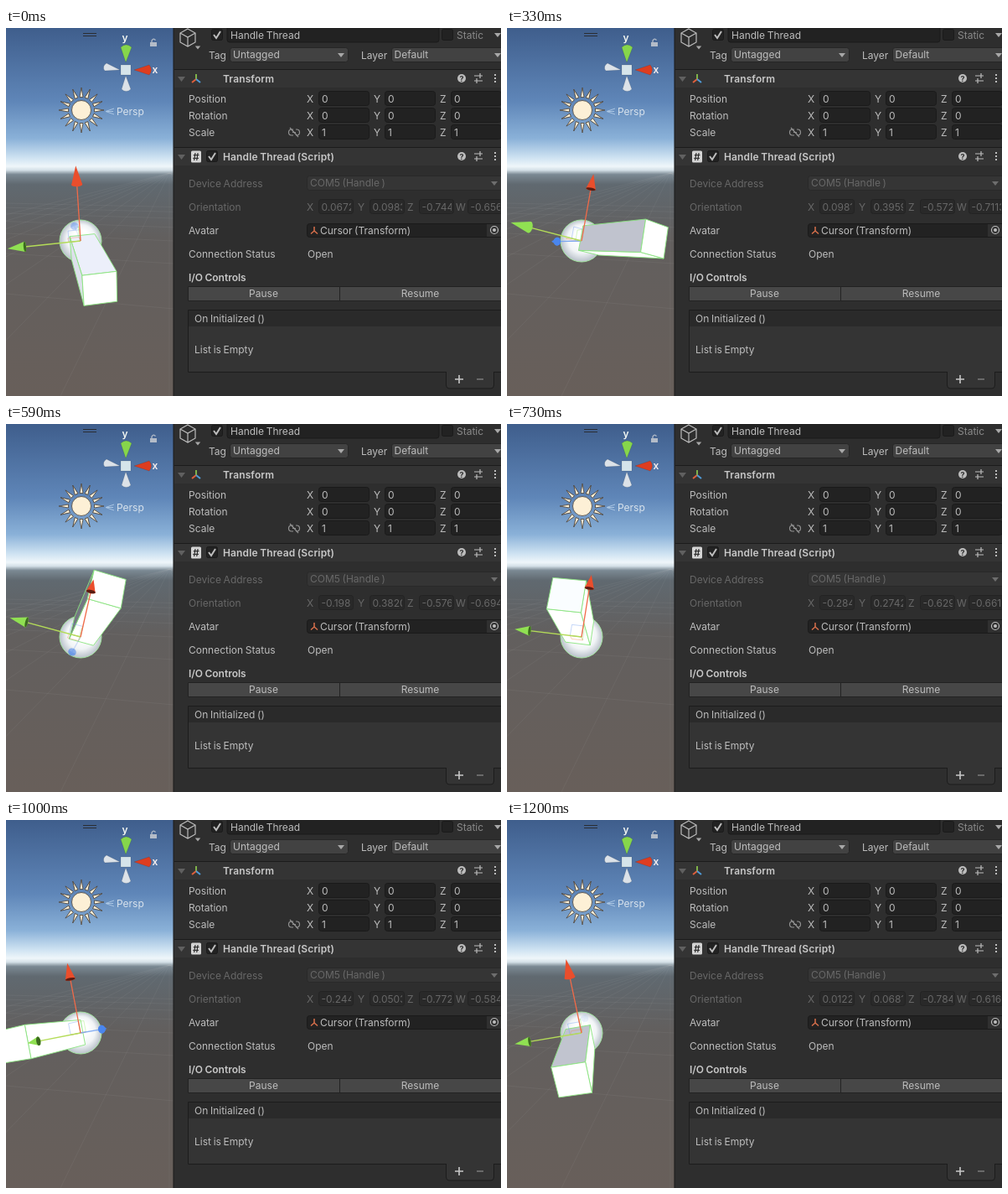
Write an HTML page with a canvas that moves like this. It is 591 px wide and 439 px high and loops after 1.28 s.

```html
<!DOCTYPE html>
<html lang="en">
<head>
<meta charset="utf-8">
<title>Handle Thread</title>
<style>
html, body { margin: 0; width: 100%; height: 100%; overflow: hidden; background: #2e2e2e; }
svg, canvas { position: absolute; left: 0; top: 0; display: block; }
text { font: 12px Inter, "Open Sans", sans-serif; word-spacing: -.7px; fill: #bdbdbd; }
.b { font-weight: 600; letter-spacing: .13px; fill: #c8c8c8; }
.dim { fill: #686868; }
.mid { text-anchor: middle; }
.field { fill: #222; stroke: #1a1a1a; }
.drop { fill: #424242; stroke: #262626; }
.line { fill: none; stroke: #bdbdbd; stroke-width: 1.2; }
</style>
</head>
<body>
<svg width="591" height="439" viewBox="0 0 591 439">
  <defs>
    <linearGradient id="sky" x2="0" y2="1">
      <stop offset="0" stop-color="#3f5e8c"/>
      <stop offset=".2" stop-color="#5f86b8"/>
      <stop offset=".3" stop-color="#8ab1d8"/>
      <stop offset=".353" stop-color="#cfe3f2"/>
      <stop offset=".376" stop-color="#eff6fa"/>
      <stop offset=".386" stop-color="#d5e1e8"/>
      <stop offset=".398" stop-color="#7b8993"/>
      <stop offset=".425" stop-color="#606970"/>
      <stop offset=".57" stop-color="#625f5e"/>
      <stop offset="1" stop-color="#685f5a"/>
    </linearGradient>
    <clipPath id="view"><path d="M0 0H200V439H0z"/></clipPath>
    <g id="axes" fill="none" stroke-width="2">
      <path d="M0 0V-6" stroke="#7fb24a"/><path d="M0 0L-5 4" stroke="#e0603c"/><path d="M0 0L5 4" stroke="#4f9bd8"/>
    </g>
    <path id="down" d="M-4 -2H4L0 3z" fill="#a8a8a8"/>
    <g id="tools">
      <circle cx="544" r="5" fill="#bdbdbd"/>
      <text x="544" y="3.5" class="mid" style="font-size:9px;font-weight:700;fill:#2e2e2e">?</text>
      <path class="line" d="M559 -3H569M559 3H569M566 -6V0M562 0V6"/>
      <path d="M583 -5h2v2h-2zM583 -1h2v2h-2zM583 3h2v2h-2z" fill="#bdbdbd"/>
    </g>
    <g id="check">
      <rect x="-6.5" y="-6.5" width="13" height="13" rx="2" class="field"/>
      <path d="M-4 0L-1 4L4 -4" class="line" style="stroke-width:2"/>
    </g>
  </defs>

  <rect width="200" height="439" fill="url(#sky)"/>
  <g id="grid" clip-path="url(#view)" stroke="#c0c0c0" stroke-opacity=".08"/>
  <path d="M92 6.500H108M92 9.500H108" stroke="#2a2d33"/>

  <g id="sun" transform="translate(90 98)" fill="#fdf0d6" stroke="#4a4038" stroke-width=".8">
    <circle r="11.5"/>
  </g>
  <path d="M129 96L119 99.500L129 103M119 99.500H128" fill="none" stroke="#a9c5e3"/>
  <text x="132" y="104" style="fill:#d8e2ec">Persp</text>

  <g stroke="#00000030" stroke-width=".6">
    <path d="M143 41L137 23Q143.500 17 150 23z" fill="#86d64b"/>
    <path d="M153 50L171 44Q176 50 171 56z" fill="#dd3d20"/>
    <path d="M136 50L120 42Q114 46 118 51z" fill="#dce2e8"/>
    <path d="M143 57L138 73Q143.500 78 149 73z" fill="#dce2e8"/>
    <path d="M137 44H149V56H137z" fill="#d5e4ea"/>
  </g>
  <text x="142" y="16" class="b mid" style="fill:#f2f6f2">y</text>
  <text x="178" y="54" class="b mid" style="fill:#f6eeee">x</text>
  <path d="M172 17H180V22H172z" fill="#b4bcc8"/>
  <path d="M174 17V15Q176 11.500 178.500 14.500" fill="none" stroke="#b4bcc8" stroke-width="1.3"/>

  <rect x="200" width="391" height="439" fill="#2e2e2e"/>
  <rect x="199.500" width="1" height="439" fill="#1b1b1b"/>
  <path d="M201 49.500H591M201 142.500H591" stroke="#1b1b1b"/>
  <path d="M201 50H591V71H201zM201 143H591V164H201z" fill="#343434"/>

  <path class="line" d="M217 1L226 6V17L217 22L208 17V6zM208 6L217 11L226 6M217 11V22"/>
  <use href="#down" transform="translate(229 23) scale(.8)"/>
  <use href="#check" x="252" y="8"/>
  <rect x="264" y="-3" width="253" height="20" rx="3" class="field"/>
  <text x="268" y="13">Handle Thread</text>
  <rect x="520.500" y="1.500" width="13" height="13" rx="2" class="field"/>
  <text x="538" y="13" style="fill:#8a8a8a">Static</text>
  <use href="#down" x="587" y="8"/>

  <text x="242" y="37">Tag</text>
  <rect x="267.500" y="23.500" width="141" height="17" rx="3" class="drop"/>
  <text x="271" y="36">Untagged</text><use href="#down" x="400" y="32"/>
  <text x="424" y="37">Layer</text>
  <rect x="460.500" y="23.500" width="140" height="17" rx="3" class="drop"/>
  <text x="463.500" y="36">Default</text><use href="#down" x="587" y="32"/>

  <path d="M205 58H214L209.500 64zM205 151H214L209.500 157z" fill="#606060"/>
  <use href="#axes" x="227" y="61"/>
  <text x="259" y="65" class="b">Transform</text><use href="#tools" y="60"/>
  <text x="218" y="89">Position</text>
  <text x="218" y="109">Rotation</text>
  <text x="218" y="129">Scale</text>
  <path class="line" opacity=".7" d="M343 121H341A3.500 3.500 0 0 0 341 128H343M346 121H347A3.500 3.500 0 0 1 347 128H346M342 124.500H346M339 119L349 130"/>
  <g id="vectors"></g>

  <rect x="221" y="146.500" width="12" height="14" rx="1.500" fill="#d5d5d5"/>
  <text x="227" y="158" class="b mid" style="fill:#2b2b2b">#</text>
  <use href="#check" x="246" y="153"/>
  <text x="259" y="158" class="b">Handle Thread (Script)</text><use href="#tools" y="153"/>

  <text x="218" y="190" class="dim">Device Address</text>
  <rect x="359.500" y="176.500" width="240" height="17" rx="3" fill="#353535" stroke="#292929"/>
  <text x="363" y="189" class="dim">COM5 (Handle )</text>
  <use href="#down" x="583" y="185" opacity=".5"/>
  <text x="218" y="218" class="dim">Orientation</text>
  <g id="quat"></g>

  <text x="218" y="246">Avatar</text>
  <rect x="359.500" y="233.500" width="240" height="16" rx="3" class="field"/>
  <path d="M368 242V237M368 242L364 245.500M368 242L372 245.500" fill="none" stroke="#d9704c" stroke-width="1.500"/>
  <text x="375" y="246">Cursor (Transform)</text>
  <path d="M574 234H591V249H574z" fill="#303030"/>
  <circle cx="583" cy="241" r="4.500" class="line"/><circle cx="583" cy="241" r="2" fill="#bdbdbd"/>
  <text x="218" y="274">Connection Status</text><text x="360" y="274">Open</text>

  <text x="218" y="302" class="b" style="letter-spacing:0">I/O Controls</text>
  <path d="M217.500 308.500H398.500V325.500H217.500zM398.500 308.500H595V325.500H398.500z" fill="#474747" stroke="#222"/>
  <text x="307.500" y="321" class="mid">Pause</text><text x="494.500" y="321" class="mid">Resume</text>

  <path d="M217.500 336.500H595V410.500H217.500z" fill="#343434" stroke="#1c1c1c"/>
  <path d="M218 337H591V356H218z" fill="#2a2a2a"/>
  <text x="225" y="351">On Initialized ()</text>
  <text x="225" y="388">List is Empty</text>
  <path d="M525.500 410V426Q525.500 430 529 430H579Q582.500 430 582.500 426V410" fill="#343434" stroke="#1c1c1c"/>
  <path d="M536 419H546M541 414V424" stroke="#c8c8c8" stroke-width="1.600"/>
  <path d="M562 419H570" stroke="#777" stroke-width="1.600"/>
</svg>
<canvas id="stage" width="200" height="439"></canvas>

<script>
const $ = id => document.getElementById(id);
const add = (id, markup) => $(id).insertAdjacentHTML('beforeend', markup);

for (let i = 0; i < 16; i++) add('sun', `<path d="M-2 -15.500L0 -27L2 -15.500z" transform="rotate(${i * 22.5})"/>`);

for (let i = -8; i < 9; i++) add('grid', `<path d="M195 173L${195 + i * 130} 439"/>`);
for (let i = 1; i < 9; i++) {
  const y = 173 + 300 / i;
  add('grid', `<path d="M0 ${y - 12 / i}L200 ${y + 24 / i}"/>`);
}

[['X', 359, 377], ['Y', 439, 456], ['Z', 518, 535]].forEach(([name, x, left]) => [0, 0, 1].forEach((value, row) => {
  const y = 89 + row * 20;
  add('vectors', `<text x="${x}" y="${y}">${name}</text>
    <rect x="${left - 3.5}" y="${y - 13.5}" width="60" height="17" rx="3" class="field"/>
    <text x="${left}" y="${y}">${value}</text>`);
}));

[['X', 359], ['Y', 420], ['Z', 479], ['W', 537]].forEach(([name, x], i) => add('quat',
  `<text x="${x}" y="218" class="dim">${name}</text>
   <rect x="${x + 14.5}" y="204.500" width="41" height="17" rx="3" fill="#292929" stroke="#232323"/>
   <clipPath id="clip${i}"><rect x="${x + 15}" y="204" width="38" height="18"/></clipPath>
   <text x="${x + 17.5}" y="218" class="dim value" clip-path="url(#clip${i})"></text>`));
const values = document.querySelectorAll('.value');

// time, box direction x y, red arrow direction x y, quaternion x y z w
const LOOP = 1280;
const keys = [
  [0, .137, -.336, -6, 93, .0672, .0983, -.7443, -.6563],
  [190, .431, -.204, 4, 91, .135, .3312, -.6284, -.6903],
  [330, .538, .012, 14, 78, .0981, .3959, -.5722, -.7113],
  [590, .189, .339, 15, 66, -.1983, .382, -.5763, -.6943],
  [860, -.368, .167, 4, 77, -.3203, .1525, -.6953, -.6243],
  [1000, -.473, -.082, -16, 84, -.2443, .0503, -.7723, -.5843],
  [1200, -.068, -.33, -19, 90, .0122, .0681, -.7843, -.6163]
];
const steps = [0, 70, 130, 190, 260, 330, 400, 460, 520, 590, 660, 730, 800, 860, 930, 1000, 1060, 1130, 1200];

function keyAt(i) {
  const n = keys.length, [t, ...rest] = keys[(i + n) % n];
  return [t + Math.floor(i / n) * LOOP, ...rest];
}

// Periodic cubic spline through the keys
function pose(t) {
  const i = keys.findLastIndex(k => k[0] <= t);
  const [a, b, c, d] = [-1, 0, 1, 2].map(j => keyAt(i + j));
  const span = c[0] - b[0], s = (t - b[0]) / span;
  return b.slice(1).map((p, j) => {
    const k = j + 1, q = c[k];
    const m = (q - a[k]) / (c[0] - a[0]) * span, n = (d[k] - p) / (d[0] - b[0]) * span;
    return p + s * (m + s * (3 * (q - p) - 2 * m - n + s * (2 * (p - q) + m + n)));
  });
}

const g = $('stage').getContext('2d');
const CX = 89, CY = 254, SIZE = 14, START = 20, LENGTH = 116, ARM = 85, DEPTH = 340;
const dot = (a, b) => a[0] * b[0] + a[1] * b[1] + a[2] * b[2];
const cross = (a, b) => [a[1] * b[2] - a[2] * b[1], a[2] * b[0] - a[0] * b[2], a[0] * b[1] - a[1] * b[0]];
const mul = (a, k) => a.map(v => v * k);
const sum = (...vs) => [0, 1, 2].map(i => vs.reduce((s, v) => s + v[i], 0));
const unit = a => mul(a, 1 / Math.hypot(...a));
const project = (v, depth = DEPTH) => {
  const k = 1 / (1 - v[2] / depth);
  return [CX + v[0] * k, CY - v[1] * k];
};

function path(points, closed = true) {
  g.beginPath();
  points.forEach(p => g.lineTo(...p));
  if (closed) g.closePath();
}

function ball() {
  const shade = g.createRadialGradient(CX + 1, CY - 5, 8, CX, CY, 26);
  shade.addColorStop(0, '#fff');
  shade.addColorStop(.5, '#f1f4f6');
  shade.addColorStop(1, '#b4bcc6');
  g.fillStyle = shade;
  g.strokeStyle = '#a5eda0';
  g.beginPath();
  g.arc(CX, CY, 25, 0, 7);
  g.fill();
  g.stroke();
}

// Only sides that face left fall into shade
function tone([x, y, z]) {
  const v = Math.min(255, 255 - Math.max(0, -x) * (80 + 300 * y - 130 * z));
  return `rgb(${v},${Math.min(255, v + 3)},${Math.min(255, v + 14)})`;
}

function face(normal, center, p, q) {
  if (dot(normal, sum([0, 0, DEPTH], mul(center, -1))) <= 0) return;
  const corners = [[1, 1], [1, -1], [-1, -1], [-1, 1]]
    .map(([i, j]) => project(sum(center, mul(p, i), mul(q, j))));
  g.fillStyle = tone(normal);
  g.strokeStyle = '#8be57f';
  path(corners);
  g.fill();
  g.stroke();
}

function box(u, red, green) {
  const half = mul(u, (LENGTH - START) / 2), mid = mul(u, (LENGTH + START) / 2);
  for (const [a, b] of [[red, green], [green, red]])
    for (const sign of [1, -1]) {
      const n = mul(a, sign);
      face(n, sum(mid, mul(n, SIZE)), half, mul(b, SIZE));
    }
  face(u, mul(u, LENGTH), mul(red, SIZE), mul(green, SIZE));
}

function arrow(axis, color, dark, line) {
  const tip = project(mul(axis, ARM), 260), base = project(mul(axis, ARM * .77), 260);
  const angle = Math.atan2(tip[1] - base[1], tip[0] - base[0]);
  const w = 6 / (1 - axis[2] * .25), dx = -Math.sin(angle) * w, dy = Math.cos(angle) * w;
  g.strokeStyle = line;
  path([[CX, CY], base], false);
  g.stroke();
  const rim = () => {
    g.beginPath();
    g.ellipse(...base, Math.max(1.6, w * Math.abs(axis[2])), w, angle, 0, 7);
    g.fill();
  };
  g.fillStyle = color;
  rim();
  path([tip, [base[0] + dx, base[1] + dy], [base[0] - dx, base[1] - dy]]);
  g.fill();
  if (axis[2] < .15) {
    g.fillStyle = dark;
    rim();
  }
}

function plane(a, b, color) {
  g.strokeStyle = color;
  path([[0, 0, 0], mul(a, 14), sum(mul(a, 14), mul(b, 14)), mul(b, 14)].map(v => project(v)));
  g.stroke();
}

function draw(t) {
  const [x, y, rx, ry, ...quat] = pose(t);
  const flat = Math.hypot(x, y), z = Math.sqrt(1 - flat * flat);
  const u = [x, y, z], red = unit([rx, ry, -(rx * x + ry * y) / z]);
  const green = cross(u, red), blue = mul(u, -1);
  g.clearRect(0, 0, 200, 439);
  g.lineWidth = .9;
  ball();
  box(u, red, green);
  g.globalAlpha = .45;
  plane(red, green, '#6f9cf0');
  plane(red, blue, '#9be86a');
  plane(green, blue, '#f08a5c');
  g.lineWidth = 1.3;
  g.globalAlpha = Math.min(1, Math.max(0, (flat - .33) * 6));
  arrow(blue, '#4a86ee', '#4a86ee', '#7aa6f0');
  g.globalAlpha = 1;
  arrow(green, '#90e052', '#3c6a20', '#b4dc58');
  arrow(red, '#ea4e2c', '#5a1c12', '#f06a48');
  quat.forEach((v, i) => { values[i].textContent = v.toFixed(4); });
}

function tick(now) {
  const t = now % LOOP;
  draw(steps.findLast(s => s <= t));
  requestAnimationFrame(tick);
}
requestAnimationFrame(tick);
</script>
</body>
</html>
```
